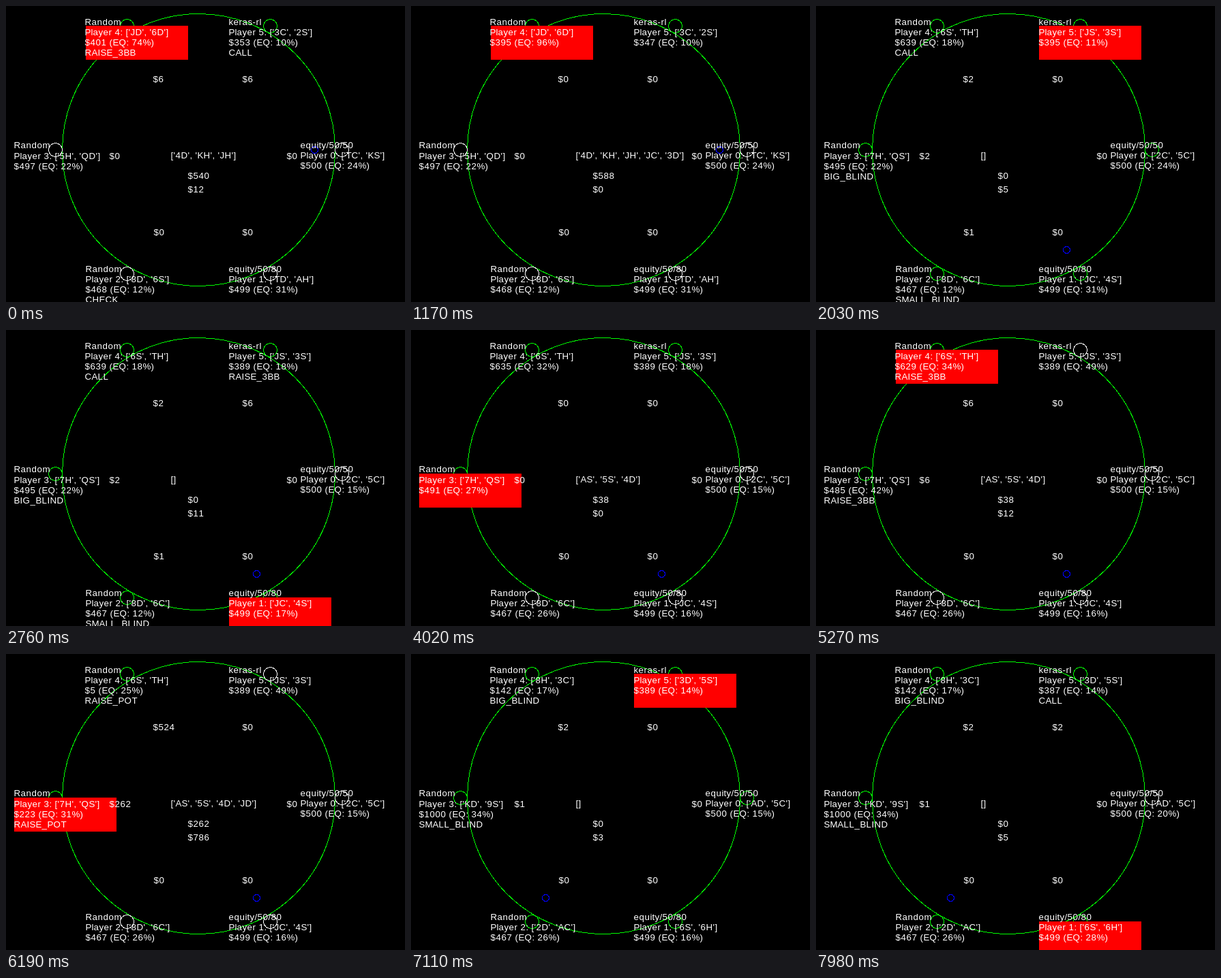
Animation of 585x435 px, one loop 8000 ms. Source, as an HTML page:

```html
<!DOCTYPE html>
<html lang="en">
<head>
<meta charset="utf-8">
<title>Poker table</title>
<style>
  html, body { margin: 0; width: 100%; height: 100%; overflow: hidden; background: #000; }
  svg { display: block; width: 585px; height: 435px; }
  circle { fill: none; stroke-width: 1; shape-rendering: crispEdges; }
  text { font: 13.333px "Liberation Sans", Arial, sans-serif; fill: #fff; }
</style>
</head>
<body>
<svg id="table" viewBox="0 0 585 435"></svg>
<script>
const LOOP = 8000, CX = 282, CY = 211;
const GREEN = '#0f0', WHITE = '#fff', BLUE = '#00f', RED = '#f00';
const svg = document.getElementById('table');
const pen = document.createElement('canvas').getContext('2d');
pen.font = '13.333px "Liberation Sans", Arial, sans-serif';

// text x, name baseline, bet x, bet baseline
const seats = [
  { name: 'equity/50/50', x: 432, y: 209, bx: 412, by: 225 },
  { name: 'equity/50/80', x: 327, y: 391, bx: 347, by: 337 },
  { name: 'Random', x: 117, y: 391, bx: 217, by: 337 },
  { name: 'Random', x: 12, y: 209, bx: 152, by: 225, drop: 1 },
  { name: 'Random', x: 116, y: 28, bx: 216, by: 112 },
  { name: 'keras-rl', x: 327, y: 28, bx: 347, by: 112 }
];

/* ---- game state ---- */
const player = (cards, cash, eq, out, bet = 0, act = '') => ({ cards, cash, eq, out, bet, act });
const game = {
  red: 4, dealer: 0, pot: 540, board: ['4D', 'KH', 'JH'],
  players: [
    player('TC KS', 500, 24, true),
    player('TD AH', 499, 31, true),
    player('8D 6S', 468, 12, true, 0, 'CHECK'),
    player('5H QD', 497, 22, true),
    player('JD 6D', 401, 74, false, 6, 'RAISE_3BB'),
    player('3C 2S', 353, 10, false, 6, 'CALL')
  ]
};
const P = game.players;
const total = g => g.players.reduce((sum, p) => sum + p.bet, 0);

const turn = i => { game.red = i; };
const eq = (i, n) => { P[i].eq = n; };
const fold = i => { P[i].out = true; };
const act = (i, name, n = 0) => {
  P[i].cash -= n;
  P[i].bet += n;
  P[i].act = name;
};
const street = (...cards) => {
  game.pot += 2 * total(game);
  game.board.push(...cards);
  P.forEach(p => { p.bet = 0; p.act = ''; });
};
const newHand = (dealer, hands) => {
  game.dealer = dealer;
  game.pot = 0;
  game.board = [];
  P.forEach((p, i) => Object.assign(p, { cards: hands[i], bet: 0, act: '', out: false }));
  act(dealer + 1, 'SMALL_BLIND', 1);
  act(dealer + 2, 'BIG_BLIND', 2);
  turn(dealer + 3);
};

const script = [
  [0, () => {}],
  [70, () => { street('JC'); turn(4); }],
  [200, () => eq(4, 88)],
  [330, () => { act(4, 'RAISE_3BB', 6); turn(5); }],
  [450, () => { act(5, 'RAISE_3BB', 6); turn(4); }],
  [580, () => eq(4, 90)],
  [710, () => { act(4, 'CHECK'); turn(5); }],
  [1040, () => { street('3D'); turn(4); }],
  [1170, () => eq(4, 96)],
  [1300, () => { act(4, 'CHECK'); turn(5); }],
  [1430, () => eq(5, 11)],

  [1630, () => {
    P[4].cash = 641;
    P[5].cash = 395;
    newHand(1, ['2C 5C', 'JC 4S', '8D 6C', '7H QS', '6S TH', 'JS 3S']);
    eq(4, 16);
  }],
  [1830, () => eq(4, 18)],
  [2030, () => { act(4, 'CALL', 2); turn(5); }],
  [2160, () => eq(5, 18)],
  [2360, () => { act(5, 'RAISE_3BB', 6); turn(0); eq(0, 15); }],
  [2760, () => { fold(0); turn(1); eq(1, 17); }],
  [2890, () => eq(1, 16)],
  [3100, () => { fold(1); turn(2); }],
  [3230, () => eq(2, 26)],
  [3360, () => { fold(2); turn(3); eq(3, 27); }],
  [3690, () => { act(3, 'CALL', 4); turn(4); }],
  [3820, () => eq(4, 32)],
  [4020, () => { act(4, 'CALL', 4); street('AS', '5S', '4D'); turn(3); }],
  [4150, () => { act(3, 'CHECK'); turn(4); }],
  [4280, () => eq(4, 33)],
  [4480, () => { act(4, 'RAISE_3BB', 6); turn(5); }],
  [4610, () => eq(5, 49)],
  [4810, () => { fold(5); turn(3); }],
  [4940, () => eq(3, 42)],
  [5140, () => { act(3, 'RAISE_3BB', 6); turn(4); }],
  [5270, () => eq(4, 34)],
  [5470, () => { act(4, 'RAISE_2POT', 100); street('JD'); turn(3); }],
  [5600, () => { act(3, 'RAISE_POT', 262); turn(4); }],
  [5730, () => eq(4, 25)],
  [5930, () => { act(4, 'RAISE_POT', 524); turn(3); }],
  [6060, () => eq(3, 32)],
  [6190, () => eq(3, 31)],
  [6320, () => { act(3, 'ALL_IN', 223); turn(4); }],
  [6450, () => street('7C')],
  [6650, () => act(4, 'CHECK')],
  [6780, () => eq(4, 20)],

  [7110, () => {
    P[3].cash = 1001;
    P[4].cash = 144;
    newHand(2, ['AD 5C', '6S 6H', '2D AC', 'KD 9S', '8H 3C', '3D 5S']);
    eq(3, 34); eq(4, 17); eq(5, 14);
  }],
  [7320, () => { act(5, 'CALL', 2); turn(0); }],
  [7450, () => eq(0, 28)],
  [7650, () => eq(0, 20)],
  [7850, () => { fold(0); turn(1); }],
  [7980, () => eq(1, 28)]
];
const states = script.map(([time, step]) => {
  step();
  return { time, ...JSON.parse(JSON.stringify(game)) };
});

/* ---- drawing ---- */
const add = (tag, attrs, text) => {
  const el = document.createElementNS(svg.namespaceURI, tag);
  for (const key in attrs) el.setAttribute(key, attrs[key]);
  if (text) el.textContent = text;
  svg.append(el);
};
const ring = (x, y, r, stroke) => add('circle', { cx: x + 0.5, cy: y + 0.5, r, stroke });
const polar = (i, r) => [
  Math.round(CX + r * Math.cos(i * Math.PI / 3)),
  Math.round(CY + r * Math.sin(i * Math.PI / 3))
];
// every glyph advances by a whole number of pixels
const write = (str, x, y) => {
  const xs = [];
  let left = x - 0.4;
  for (const ch of str) {
    xs.push(left);
    left += Math.ceil(pen.measureText(ch).width - 0.2);
  }
  add('text', { x: xs.join(' '), y }, str);
};
const list = cards => '[' + cards.map(c => `'${c}'`).join(', ') + ']';

function draw(g) {
  svg.replaceChildren();
  ring(CX, CY, 200, GREEN);
  g.players.forEach((p, i) => ring(...polar(i, 210), 10, p.out ? WHITE : GREEN));
  const [rx, ry] = polar(g.red, 210);
  add('rect', { x: rx - 60, y: ry, width: 150, height: 50, fill: RED });
  ring(...polar(g.dealer, 170), 5, BLUE);

  g.players.forEach((p, i) => {
    const { name, x, y, bx, by, drop = 0 } = seats[i];
    const rows = [`Player ${i}: ${list(p.cards.split(' '))}`, `$${p.cash} (EQ: ${p.eq}%)`, p.act];
    write(name, x, y);
    rows.forEach((row, k) => write(row, x, y + drop + 15 * (k + 1)));
    write('$' + p.bet, bx, by);
  });
  write(list(g.board), 242, 224);
  write('$' + g.pot, 267, 254);
  write('$' + total(g), 267, 274);
}

let shown = -1;
const start = performance.now();
function tick() {
  const t = (performance.now() - start) % LOOP;
  const now = states.findLastIndex(s => s.time <= t);
  if (now !== shown) draw(states[shown = now]);
  requestAnimationFrame(tick);
}
tick();
</script>
</body>
</html>
```
